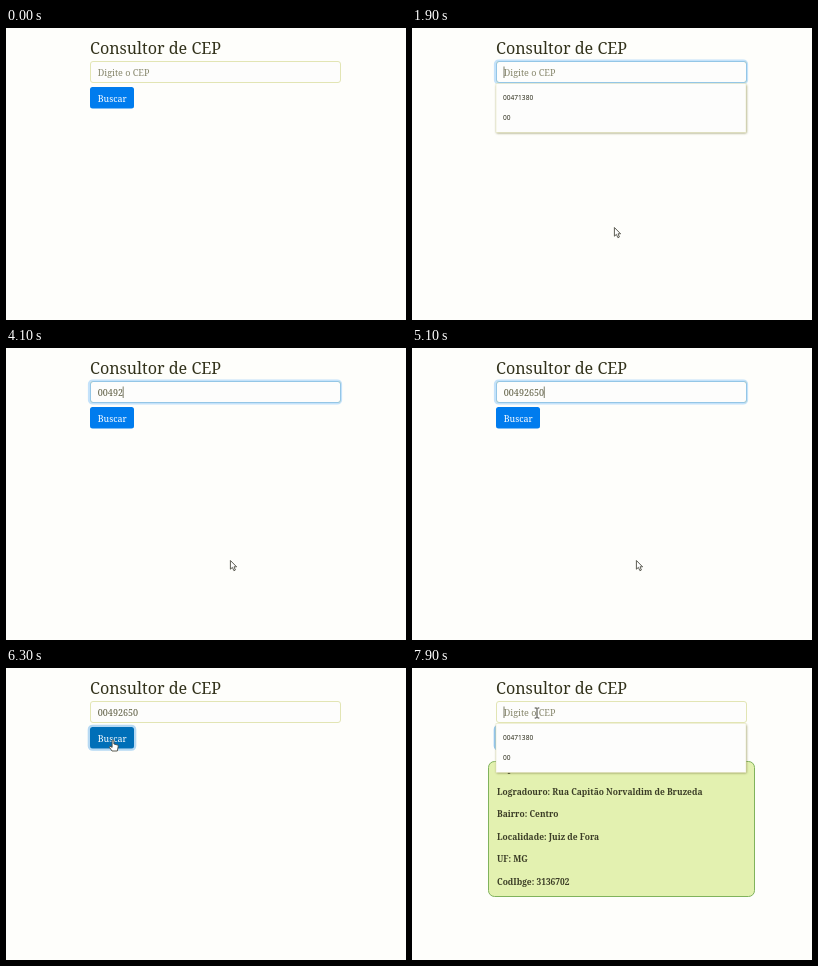
An HTML page that plays this animation: 400x292 px, repeating every 8000 ms.

```html
<!DOCTYPE html>
<html lang="pt-BR">
<head>
<meta charset="utf-8">
<title>Consultor de CEP</title>
<style>
  html, body { margin: 0; width: 100%; height: 100%; overflow: hidden; background: #fefefb; }
  svg { display: block; width: 100vw; height: 100vh; }
  text { font-family: "Noto Serif", serif; white-space: pre; }
  .title { font-size: 16.1px; font-weight: 500; fill: #33331c; }
  .field { font-size: 9px; }
  .label { font-size: 8.9px; font-weight: 500; fill: #fff; }
  .option { font: 500 6.6px "Noto Sans", sans-serif; fill: #2e2e1c; }
  .row { font-size: 8.45px; font-weight: 700; fill: #3b3d26; }
  .pointer { fill: #fff; stroke: #4a4a40; stroke-width: .9; stroke-linejoin: round; }
</style>
</head>
<body>
<svg viewBox="0 0 400 292">
  <defs>
    <filter id="soft" x="-5%" y="-20%" width="110%" height="150%"><feGaussianBlur stdDeviation="1"/></filter>
  </defs>
  <rect width="400" height="292" fill="#fefefb"/>
  <text class="title" x="84" y="26">Consultor de CEP</text>

  <rect id="inputRing" x="83" y="32.5" width="252" height="23" rx="3.5" fill="none" stroke="#c4e2fa" stroke-width="2.2"/>
  <rect x="84.5" y="33.5" width="250" height="21" rx="2.5" fill="#fdfdfc" stroke="#e2e5b4"/>
  <rect id="inputEdge" x="84.5" y="33.5" width="250" height="21" rx="2.5" fill="none" stroke="#94c6e6"/>
  <text id="value" class="field" x="91.8" y="48"></text>
  <path id="caret" d="M0 38.5V50" stroke="#5c5c44" stroke-width=".8"/>

  <rect id="buttonRing" x="83" y="58" width="46" height="23.5" rx="3.5" fill="none" stroke="#94c8f0" stroke-width="2.6"/>
  <rect id="button" x="84" y="59" width="44" height="21.5" rx="2.5"/>
  <text class="label" x="91.8" y="73.5">Buscar</text>

  <g id="panel">
    <rect x="76.5" y="93.5" width="266" height="135" rx="6" fill="#e3f1b0" stroke="#80b35c"/>
  </g>

  <g id="dropdown">
    <rect id="shadow" x="84.5" y="57" width="250" fill="#85854a" opacity=".85" filter="url(#soft)"/>
    <rect id="sheet" x="84" y="55.5" width="250" fill="#fdfdfc" stroke="#e6e6bc" stroke-width=".5"/>
    <text class="option" x="91" y="72.4">00471380</text>
    <text id="shortOption" class="option" x="91" y="92.4">00</text>
  </g>

  <g id="cursor">
    <path id="arrow" class="pointer" d="M.4 .5V9.2L2.4 7.4L3.9 10.7L5.4 10L4 6.8H6.6Z"/>
    <path id="hand" class="pointer" d="M-.9 .4Q0-.6 .9 .4V4L4.6 5Q5.4 5.4 5.2 6.6L4.3 11H-1L-3.6 7.2Q-3.4 5.8-2 6.6L-.9 7.4Z"/>
    <path id="beam" d="M-2.3-5H-.6L0-4.4L.6-5H2.3M0-4.4V4.4M-2.3 5H-.6L0 4.4L.6 5H2.3" fill="none" stroke="#3c3c34"/>
  </g>
</svg>
<script>
const DURATION = 8000, STEP = 100;
const CEP = "00492650";
const KEY_TIMES = [2900, 3200, 3500, 3900, 4100, 4400, 4600, 4900];
const FIRST_CLICK = 1700, SUBMIT = 6120, RESULT = 6500, LAST_CLICK = 7900;
const ROWS = [
  "Cep: 00492-650",
  "Logradouro: Rua Capitão Norvaldim de Bruzeda",
  "Bairro: Centro",
  "Localidade: Juiz de Fora",
  "UF: MG",
  "CodIbge: 3136702"
];
// time, x, y of the pointer's hot spot
const PATH = [
  [100, 268, 203], [300, 190, 128], [500, 102, 66], [600, 86, 28], [800, 119, 42],
  [1300, 119, 42], [1500, 123, 48], [1700, 123, 48], [1900, 202, 199], [2400, 224, 212],
  [5200, 224, 212], [6000, 107, 72], [6300, 107, 72], [6700, 211, 218],
  [7200, 211, 218], [7300, 207, 209], [7800, 125, 45], [8000, 125, 45]
];

const $ = id => document.getElementById(id);
const clamp = v => Math.max(0, Math.min(1, v));
const show = (id, on) => { $(id).style.display = on ? "" : "none"; };
const set = (id, name, value) => $(id).setAttribute(name, value);
const inside = (x, y, left, top, right, bottom) => x >= left && x <= right && y >= top && y <= bottom;

ROWS.forEach((content, i) => {
  const row = document.createElementNS("http://www.w3.org/2000/svg", "text");
  row.setAttribute("class", "row");
  row.setAttribute("x", 85);
  row.setAttribute("y", 104.3 + i * 22.45);
  row.textContent = content;
  $("panel").append(row);
});

function pointerAt(t) {
  const next = Math.max(1, PATH.findIndex(p => p[0] > t));
  const [t0, x0, y0] = PATH[next - 1], [t1, x1, y1] = PATH[next];
  const p = clamp((t - t0) / (t1 - t0)), k = p * p * (3 - 2 * p);
  return [x0 + (x1 - x0) * k, y0 + (y1 - y0) * k];
}

function drawField(t) {
  const ramp = start => clamp((t - start) / 150);
  const typed = t < RESULT ? CEP.slice(0, KEY_TIMES.filter(k => k <= t).length) : "";
  const focus = ramp(FIRST_CLICK) - ramp(SUBMIT) + ramp(LAST_CLICK);
  const value = $("value");
  value.textContent = typed || "Digite o CEP";
  value.setAttribute("fill", typed ? "#5c5c40" : "#85856a");
  set("inputRing", "opacity", focus ** 2);
  set("inputEdge", "opacity", focus);
  show("caret", (t >= FIRST_CLICK && t < SUBMIT) || t >= LAST_CLICK);
  const caretX = 92 + (typed ? value.getComputedTextLength() : 0);
  set("caret", "transform", `translate(${caretX})`);
  set("buttonRing", "opacity", ramp(SUBMIT + 80) - ramp(LAST_CLICK));
}

function drawDropdown(t) {
  const open = (t >= FIRST_CLICK && t < KEY_TIMES[3]) || t >= LAST_CLICK;
  const both = t < KEY_TIMES[2] || t >= LAST_CLICK;
  const height = both ? 49 : 29;
  show("dropdown", open);
  show("shortOption", both);
  set("sheet", "height", height);
  set("shadow", "height", height - .8);
  return open;
}

function drawPointer(t, open) {
  const [x, y] = pointerAt(t);
  const visible = t >= PATH[0][0];
  const onInput = inside(x, y, 84, 33, 335, 55);
  const onButton = visible && !open && inside(x, y, 84, 59, 128, 81);
  show("cursor", visible);
  set("cursor", "transform", `translate(${x} ${y})`);
  show("beam", onInput);
  show("hand", onButton);
  show("arrow", !onInput && !onButton);
  set("button", "fill", onButton ? "#006fb8" : "#007cee");
}

function draw(t) {
  drawField(t);
  show("panel", t >= RESULT);
  drawPointer(t, drawDropdown(t));
}

const start = performance.now();
function tick() {
  const elapsed = (performance.now() - start) % DURATION;
  draw(Math.floor(elapsed / STEP) * STEP);
  requestAnimationFrame(tick);
}
tick();
</script>
</body>
</html>
```
